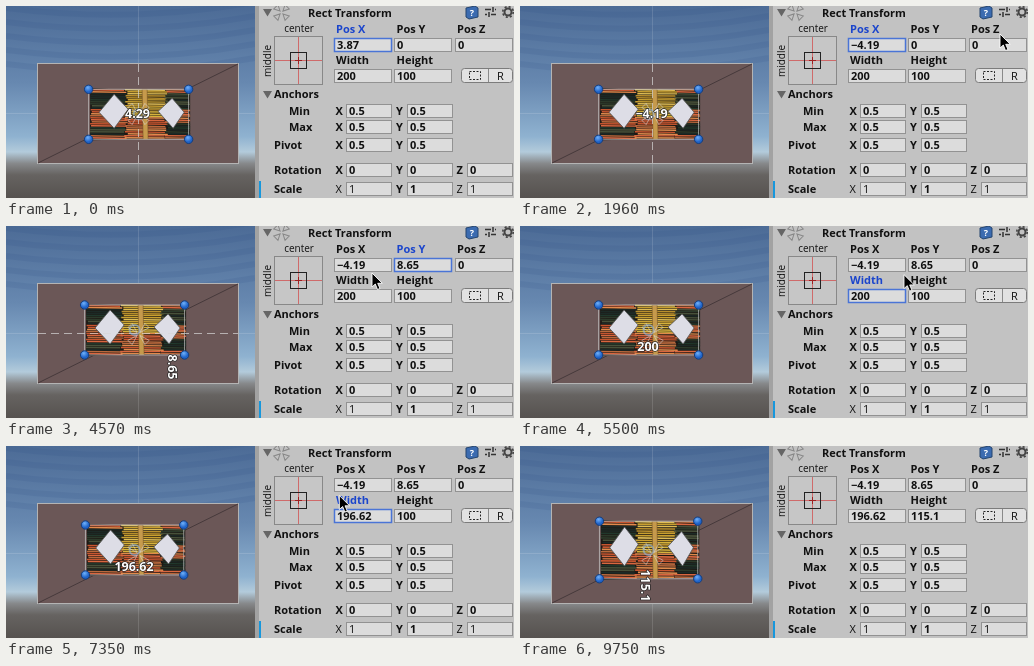
These frames come from a looping animation (508x192 px, 9850 ms). An HTML page:

```html
<!DOCTYPE html>
<html lang="en">
<head>
<meta charset="utf-8">
<title>Rect Transform</title>
<style>
html, body { margin: 0; width: 100%; height: 100%; overflow: hidden; background: #c2c2c2; }
svg { display: block; }
text { font: bold 11px "Open Sans", "Noto Sans", sans-serif; fill: #111; }
text.plain { font-weight: normal; }
text.anchor { font-size: 10px; font-weight: normal; text-anchor: middle; }
#label { font-size: 12.5px; fill: #fff; stroke: #222; stroke-width: 1.3px; paint-order: stroke; text-anchor: middle; }
.field { fill: #dcdcdc; stroke: #929292; }
.field.on { stroke: #4a74d6; stroke-width: 1.5px; }
.name.on { fill: #1b45cc; }
</style>
</head>
<body>
<svg width="508" height="192" viewBox="0 0 508 192">
  <defs>
    <linearGradient id="sky" x2="0" y2="1">
      <stop offset="0" stop-color="#4c6b96"/>
      <stop offset=".4" stop-color="#6788b0"/>
      <stop offset=".68" stop-color="#8fb2d0"/>
      <stop offset=".76" stop-color="#b3cbdb"/>
      <stop offset=".82" stop-color="#87898b"/>
      <stop offset=".88" stop-color="#666361"/>
      <stop offset="1" stop-color="#56524f"/>
    </linearGradient>
    <radialGradient id="ball" cx=".4" cy=".3">
      <stop offset="0" stop-color="#6fb0fa"/>
      <stop offset="1" stop-color="#1f63c8"/>
    </radialGradient>
  </defs>

  <!-- scene -->
  <rect width="249" height="192" fill="url(#sky)"/>
  <g id="bands" fill="none" stroke="#2f4f86" stroke-width="6" opacity=".13"></g>
  <path d="M132.5 0V192M0 107.5H249" stroke="#fff" opacity=".13"/>
  <rect x="31.5" y="57.5" width="201" height="100" fill="#6b5757" stroke="#b4b4b4"/>
  <path d="M32 157L232 58" stroke="#46393b"/>
  <g id="art"></g>
  <path id="dash" stroke="#d8d8d8" stroke-dasharray="8 5" opacity=".7"/>
  <path id="frame" fill="none" stroke="#ccc" stroke-width=".7"/>
  <circle id="pivot" r="5" fill="none" stroke="#8db5e0" stroke-width="2" opacity=".6"/>
  <g id="petals" fill="none" stroke="#ddd" stroke-width=".8" opacity=".65" transform="translate(132.5 108)"></g>
  <g id="handles"></g>
  <text id="label" y="4.5"></text>

  <!-- inspector -->
  <rect x="249" width="259" height="192" fill="#c2c2c2"/>
  <rect x="249" width="4" height="192" fill="#a2a2a2"/>
  <rect x="253" y="175" width="2" height="17" fill="#1797dc"/>
  <path d="M257 3h9l-4.5 7.5zM257 85h9l-4.5 7.5z" fill="#666"/>
  <g id="flower" fill="none" stroke="#888" transform="translate(275.5 6.5)"></g>
  <path d="M460 2l9-2 3 2v9l-9 2-3-2z" fill="#3b6bb0" stroke="#24456f"/>
  <text x="466" y="10" style="font-size:9px;fill:#fff" text-anchor="middle">?</text>
  <path d="M479 3.5h6m4 0h1M479 8.500h2m4 0h5M487 1v5M483 6v5" stroke="#333" stroke-width="1.5"/>
  <circle cx="502" cy="6" r="3.5" fill="none" stroke="#444" stroke-width="2"/>
  <circle cx="502" cy="6" r="5.3" fill="none" stroke="#444" stroke-width="1.6" stroke-dasharray="2.1 2.06"/>

  <text class="anchor" x="293" y="26">center</text>
  <text class="anchor" transform="translate(265 55) rotate(-90)">middle</text>
  <rect x="268.5" y="30.5" width="48" height="48" fill="#c6c6c6" stroke="#888"/>
  <path d="M269 54.5H316M292.5 31V78" stroke="#cf6a6a"/>
  <rect x="284.5" y="46.5" width="16" height="16" fill="none" stroke="#222"/>
  <path d="M289 54.5h7M292.500 51v7" stroke="#a02020"/>

  <rect x="455.5" y="62.5" width="51" height="14" rx="3" fill="#e2e2e2" stroke="#7c7c7c"/>
  <path d="M482.5 63V76" stroke="#8a8a8a"/>
  <rect x="463.5" y="65.5" width="11" height="8" fill="none" stroke="#222" stroke-dasharray="2 1.5"/>
  <text class="plain" x="491" y="74">R</text>
  <g id="rows"></g>
  <path id="cursor" d="M0 0V14L3.3 11L5.5 16.5L8 15.5L5.7 10.3H10.3Z" stroke="#fff" stroke-width=".9"/>
</svg>
<script>
const LOOP = 9850;
const $ = id => document.getElementById(id);
const set = (el, attrs) => { for (const k in attrs) el.setAttribute(k, attrs[k]); };

// Inspector rows share three columns
const column = i => 328 + 60.5 * i;
let rows = '';
const text = (x, y, s, cls = '', id = '') =>
  rows += `<text x="${x}" y="${y}" class="${cls}" id="${id}">${s}</text>`;
const field = (x, y, w, value, cls = '', id = '') => {
  x = Math.floor(x);
  rows += `<rect class="field" id="${id && id + 'Box'}" x="${x + .5}" y="${y + .5}" width="${w}" height="13"/>`;
  text(x + 3, y + 11, value, cls, id && id + 'Value');
};
const topRow = (y, cells) => cells.forEach(([name, id, value = ''], i) => {
  text(column(i) + 2, y - 5.5, name, 'name', id + 'Name');
  field(column(i), y, 57, value, '', id);
});
const vector = (name, x, y, value, count) => {
  text(x, y + 11, name);
  for (let i = 0; i < count; i++) {
    const cls = name == 'Scale' && i != 1 ? 'plain' : '';
    text(column(i) + 1.5, y + 11, 'XYZ'[i], cls);
    field(column(i) + 12.5, y, 45, value, cls);
  }
};
text(302, 11, 'Rect Transform');
topRow(32, [['Pos X', 'px'], ['Pos Y', 'py'], ['Pos Z', 'pz', '0']]);
topRow(63, [['Width', 'w'], ['Height', 'h']]);
text(268, 92, 'Anchors');
vector('Min', 283, 98, '0.5', 2);
vector('Max', 283, 114, '0.5', 2);
vector('Pivot', 268, 132, '0.5', 2);
vector('Rotation', 268, 157, '0', 3);
vector('Scale', 268, 176, '1', 3);
$('rows').innerHTML = rows;

// Pinwheel marks and sky bands
const petals = r => [45, 135, 225, 315].map(a =>
  `<path transform="rotate(${a})" d="M2 0L${r} -3V3Z"/>`).join('');
$('petals').innerHTML = petals(12);
$('flower').innerHTML = petals(8);
for (let y = 2; y < 60; y += 14) $('bands').innerHTML += `<path d="M0 ${y}Q125 ${y + 16} 249 ${y - 6}"/>`;

// Painted wood on a 100 by 50 board: three panels of fine coloured strokes
let seed = 7;
const rnd = () => (seed = seed * 16807 % 2147483647) / 2147483647;
const pick = list => list[Math.floor(rnd() * list.length)];
const dark = ['#20382c', '#2c3a2a', '#47513a', '#1c2a26'];
const red = ['#d9663f', '#c8552f', '#e08a4c', '#b9683c'];
const gold = ['#d6b23c', '#c9a030', '#dfbd55', '#b98f2c'];
const panels = [
  { x: 0, w: 36, paint: y => y > 3 && y < 19 || y > 37 && y < 45 ? dark : red },
  { x: 36, w: 40, paint: y => y < 28 ? gold : red },
  { x: 76, w: 24, paint: y => y > 3 && y < 19 || y > 34 && y < 46 ? dark : red }
];
let art = '<path d="M0 -1L50 1L100 1V49L50 50L0 51Z" fill="#1c1814"/>';
for (let y = .5; y < 50; y += 2) {
  for (const { x, w, paint } of panels) {
    const shift = rnd() * 4 - 2;
    art += `<path d="M${Math.max(0, x + shift)} ${y}L${Math.min(100, x + w + shift)} ${y + rnd() * .8}" stroke="${pick(paint(y))}" stroke-width="1.4"/>`;
  }
}
art += '<path d="M52 0L57 0L58 50L53 50Z" fill="#c69a4c" stroke="#6d4a22" stroke-width=".5"/>' +
  '<path d="M24 5L38 20L24 39L9 23ZM82 9L94 23L83 39L68 22Z" fill="#dddde6" stroke="#555" stroke-width=".8"/>';
$('art').innerHTML = art;
$('handles').innerHTML = '<circle r="4.2" fill="url(#ball)" stroke="#153d7c"/>'.repeat(4);

// Each drag eases through a few [time, value] points; the pointer follows the value
const modes = [
  { id: 'px', from: 0, x: 131.5, y: 107.5, dash: 'M132.5 58V157',
    keys: [[-60, 4.29], [0, 3.87], [560, 12.6], [1780, -4.19]] },
  { id: 'py', from: 2400, x: 166, y: 141, turn: 90, dash: 'M32 107.5H232',
    keys: [[2900, 0], [3120, .7], [3180, .7], [3850, 8.65]], pointer: v => [400 + 10 * v, 18] },
  { id: 'w', from: 5000, x: 128, y: 120,
    keys: [[5740, 200], [5960, 204.8], [6140, 200.38], [6200, 199.9], [7200, 196.62]],
    pointer: v => [386 + 20 * (v - 199.9), 49] },
  { id: 'h', from: 7740, x: 125, y: 139.5, turn: 90, digits: 1,
    keys: [[7740, 100], [8420, 10.6], [8480, 10.2], [9020, 132], [9240, 115.1]],
    pointer: v => [400 + 2.07 * (v - 100), 52] }
];
// Free pointer travel between the drags: [time, x, y]
const travel = [[1840, 489, 40], [1960, 480, 28], [2500, 400, 18], [3850, 486, 18], [4110, 354, 61],
  [4330, 361, 56], [4560, 361, 56], [4570, 366, 47], [4750, 366, 47], [5740, 388, 49], [7200, 320, 49], [7740, 400, 52]];

const at = (keys, t, col = 1) => {
  const i = keys.findIndex(k => k[0] > t);
  if (i <= 0) return keys[i < 0 ? keys.length - 1 : 0][col];
  const a = keys[i - 1], b = keys[i], s = (t - a[0]) / (b[0] - a[0]);
  return a[col] + (b[col] - a[col]) * s * s * (3 - 2 * s);
};
const show = (v, digits = 2) => String(+v.toFixed(digits)).replace('-', '−');

// The picture advances in 60 ms steps, counted afresh from each mark
const marks = [0, 1960, 3180, 4570, 6200, 8480, 9750];
const step = t => {
  const m = marks.filter(v => v <= t).pop();
  return m + Math.floor((t - m) / 60) * 60;
};

function draw(t) {
  const mode = modes.filter(m => m.from <= t).pop();
  const v = {};
  for (const m of modes) {
    v[m.id] = at(m.keys, t);
    const on = m == mode && t < 9750;
    $(m.id + 'Value').textContent = show(v[m.id], m.digits);
    $(m.id + 'Name').classList.toggle('on', on);
    $(m.id + 'Box').classList.toggle('on', on);
  }
  const cx = 130.7 + v.px / 2, cy = 108.3 - v.py / 2;
  const l = cx - v.w / 4, r = cx + v.w / 4, top = cy - v.h / 4, bottom = cy + v.h / 4;
  set($('art'), { transform: `translate(${l + 1.5} ${top}) scale(${v.w / 200} ${v.h / 100})` });
  set($('frame'), { d: `M${l} ${top}H${r}V${bottom}H${l}Z` });
  set($('pivot'), { cx, cy });
  [...$('handles').children].forEach((c, i) =>
    set(c, { cx: i % 2 ? r : l, cy: i < 2 ? top : bottom }));
  set($('dash'), { d: mode.dash || '' });
  $('label').textContent = show(at(mode.keys, t - 60), mode.digits);
  set($('label'), { transform: `translate(${mode.x} ${mode.y}) rotate(${mode.turn || 0})` });

  const drag = modes.find(m => m.pointer && t >= m.keys[0][0] &&
    (m.id == 'h' || t <= m.keys[m.keys.length - 1][0]));
  const [x, y] = drag ? drag.pointer(v[drag.id]) : [at(travel, t), at(travel, t, 2)];
  const visible = t >= 1840 && t < 9750 && !(t > 2600 && t < 3300);
  set($('cursor'), { transform: `translate(${x} ${y})`, visibility: visible ? 'visible' : 'hidden' });
}

const start = performance.now();
function tick() {
  draw(step((performance.now() - start) % LOOP));
  requestAnimationFrame(tick);
}
tick();
</script>
</body>
</html>
```
